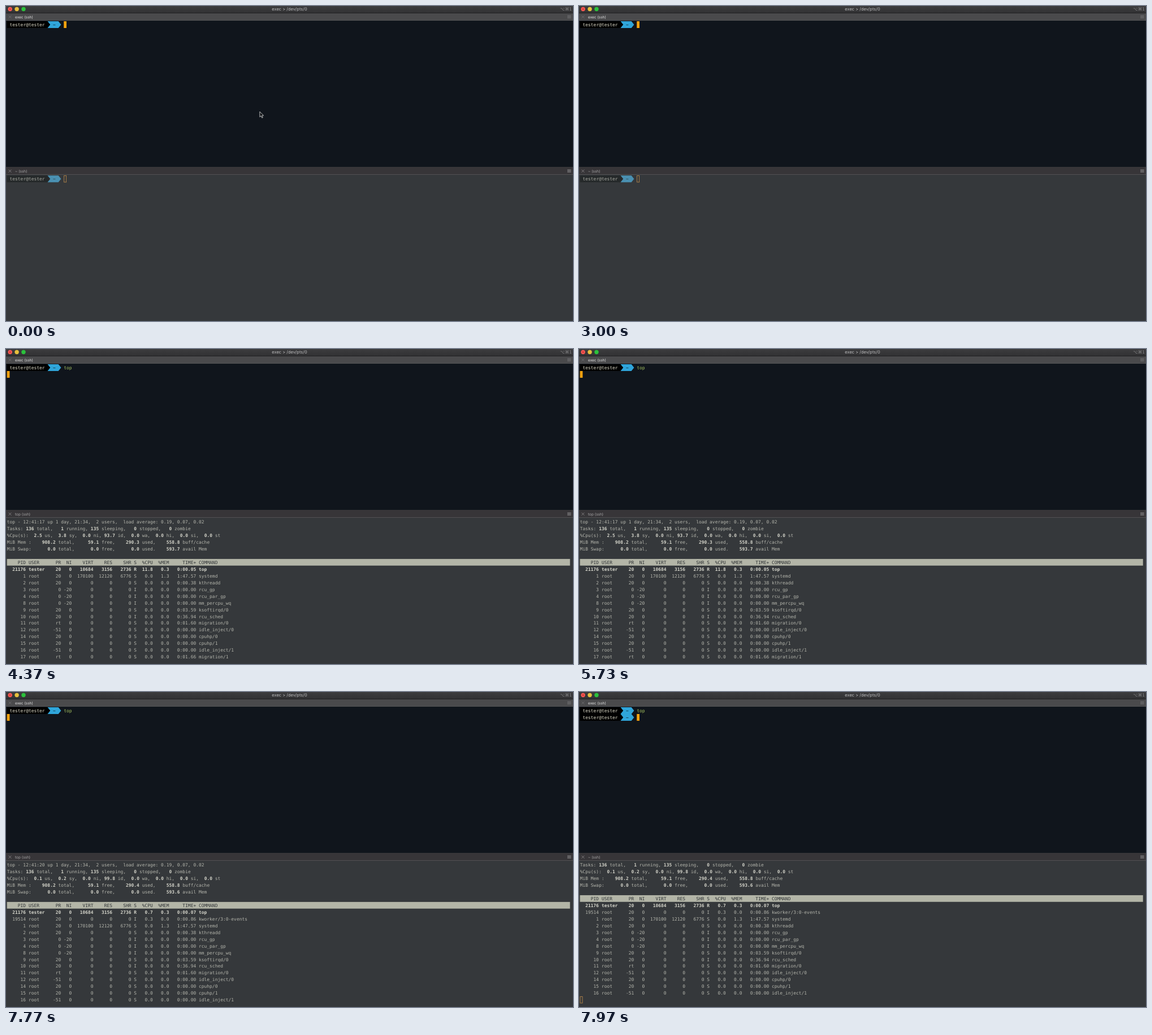
Recreate the animation shown at these times as an HTML page. Size 1003 px wide and 558 px high, loop 8 s.

```html
<!DOCTYPE html>
<html lang="en">
<head>
<meta charset="utf-8">
<title>Terminal panes</title>
<style>
  html, body { margin: 0; width: 100%; height: 100%; overflow: hidden; background: #10151c; }
  svg { display: block; width: 1003px; height: 558px; }
  text { white-space: pre; text-rendering: geometricPrecision; }
  .m { font: 7.95px "DejaVu Sans Mono", monospace; }
  .m .b { font-weight: bold; fill: #d4d4ca; }
  .u { font: 6.5px Inter, sans-serif; }
</style>
</head>
<body>
<svg id="stage" viewBox="0 0 1003 558"></svg>
<script>
const LOOP = 8000, CELL = 4.787, ROW = 11.95, LEFT = 1.7, TOP = 27, BOTTOM = 300.2;
const USER = 'tester', HOST = 'tester';
const GREY = '#b4b5ac';
const stage = document.getElementById('stage');

const colX = c => LEFT + c * CELL;
const rect = (x, y, w, h, fill, extra = '') =>
  `<rect x="${x}" y="${y}" width="${w}" height="${h}" fill="${fill}" ${extra}/>`;
const path = (d, fill, extra = '') => `<path d="${d}" fill="${fill}" ${extra}/>`;
const label = (x, y, s, fill, extra = '') =>
  `<text class="u" x="${x}" y="${y}" fill="${fill}" ${extra}>${s}</text>`;
const mono = (col, y, s, fill) =>
  `<text class="m" x="${colX(col)}" y="${y + 9}" fill="${fill}">${s}</text>`;
const bold = s => `<tspan class="b">${s}</tspan>`;

function prompt(y, dim) {
  const x = colX(15), tip = colX(16), end = colX(19), mid = y + 6, low = y + 12;
  return path(`M${LEFT} ${y}H${x}L${tip} ${mid} ${x} ${low}H${LEFT}z`, dim ? '#25292a' : '#000') +
    path(`M${x} ${y}H${end}L${colX(20)} ${mid} ${end} ${low}H${x}L${tip} ${mid}z`, dim ? '#4a90b1' : '#2fa5da') +
    mono(1, y, `${USER}@${HOST}`, dim ? '#a9aaa2' : '#dcdac8') +
    mono(17, y, '~', dim ? '#2b3336' : '#0c1116');
}

const block = (col, y) => rect(colX(col), y, CELL, 12, '#f6a20f');
const hollow = (col, y) =>
  rect(colX(col) + .4, y + .4, CELL - .8, 11.4, 'none', 'stroke="#b3854a" stroke-width=".9"');

function tabBar(y, title, active) {
  const fg = active ? '#737375' : '#8c8a8c';
  const lines = [17.2, 19.2, 21.2].map(v => `M993 ${y + v - 13}h6.6`).join('');
  return rect(0, y, 1003, 12, active ? '#4a4a4c' : '#373538') +
    rect(0, y + 12, 1003, 1, active ? '#525254' : '#525153') +
    path(`M4.5 ${y + 3.8}l5 5m0-5l-5 5`, 'none', `stroke="${fg}" stroke-width=".8"`) +
    path(lines, 'none', `stroke="${fg}" stroke-width="1"`) +
    label(16, y + 8.7, title, active ? '#e4e4e4' : '#a9a8a9');
}

const lights = ['#fc5753', '#e6bf3d', '#2bc23c']
  .map((c, i) => `<circle cx="${7.2 + 11.9 * i}" cy="5.5" r="3.7" fill="${c}"/>`).join('');
const frame =
  `<defs><linearGradient id="bar" x2="0" y2="1"><stop stop-color="#3c3c3e"/><stop offset="1" stop-color="#323234"/></linearGradient></defs>` +
  rect(0, 0, 1003, 558, '#10151c') + rect(0, 0, 1003, 12, 'url(#bar)') + rect(0, 12, 1003, 1, '#202022') +
  lights + path('M6 4.3l2.4 2.4m0-2.4l-2.4 2.4', 'none', 'stroke="#8d1d1b" stroke-width=".8"') +
  label(501.5, 8.2, 'exec &gt; /dev/pts/0', '#bcbcbd', 'text-anchor="middle" style="font-size:7.5px"') +
  label(1001, 8.2, '⌥⌘1', '#8b8b8d', 'text-anchor="end" style="font:7.5px \'DejaVu Sans\',sans-serif"') +
  tabBar(13, 'exec (ssh)', true) +
  rect(0, 285, 1003, 1, '#38373a') + rect(0, 286, 1003, 272, '#35383b');

const pointer = path('M448.9 187.2v9.4l2.2-2 1.7 3.6 1.5-.7-1.6-3.4h2.9z', '#0b0d10', 'stroke="#e6e6e6" stroke-width=".8"');

// Process list: pid, priority, nice, state, time, command
const idle = `2 20 0 S 0:00.38 kthreadd
3 0 -20 I 0:00.00 rcu_gp
4 0 -20 I 0:00.00 rcu_par_gp
8 0 -20 I 0:00.00 mm_percpu_wq
9 20 0 S 0:03.59 ksoftirqd/0
10 20 0 I 0:36.94 rcu_sched
11 rt 0 S 0:01.60 migration/0
12 -51 0 S 0:00.00 idle_inject/0
14 20 0 S 0:00.00 cpuhp/0
15 20 0 S 0:00.00 cpuhp/1
16 -51 0 S 0:00.00 idle_inject/1
17 rt 0 S 0:01.66 migration/1`.split('\n').map(line => {
  const [pid, pr, ni, state, time, cmd] = line.split(' ');
  return [pid, 'root', pr, ni, 0, 0, 0, state, '0.0', '0.0', time, cmd];
});
const systemd = '1 root 20 0 170100 12120 6776 S 0.0 1.3 1:47.57 systemd'.split(' ');
const kworker = '19514 root 20 0 0 0 0 I 0.3 0.0 0:00.86 kworker/3:0-events'.split(' ');
const heads = 'PID USER PR NI VIRT RES SHR S %CPU %MEM TIME+ COMMAND'.split(' ');
const widths = [7, -8, 3, 3, 7, 6, 6, 1, 5, 5, 9, -1];
const columns = row => row.map((v, i) =>
  widths[i] < 0 ? String(v).padEnd(-widths[i]) : String(v).padStart(widths[i])).join(' ');

function topLines(second) {
  const pick = (a, b) => second ? b : a;
  const summary = [
    'Tasks: 136 total,   1 running, 135 sleeping,   0 stopped,   0 zombie',
    `%Cpu(s):  ${pick('2.5 us,  3.8', '0.1 us,  0.2')} sy,  0.0 ni, ${pick(93.7, 99.8)} id,  0.0 wa,  0.0 hi,  0.0 si,  0.0 st`,
    `MiB Mem :    908.2 total,     59.1 free,    ${pick(290.3, 290.4)} used,    558.8 buff/cache`,
    `MiB Swap:      0.0 total,      0.0 free,      0.0 used.    ${pick(593.7, 593.6)} avail Mem`
  ].map(s => s.replace(/\d[\d.]*(?= [a-z])/g, bold));
  const self = [21176, USER, 20, 0, 10684, 3156, 2736, 'R', pick('11.8', '0.7'), '0.3', pick('0:00.05', '0:00.07'), 'top'];
  const rows = [...(second ? [kworker] : []), systemd, ...idle].slice(0, 13);
  return [`top - 12:41:${pick(17, 20)} up 1 day, 21:34,  2 users,  load average: 0.19, 0.07, 0.02`,
    ...summary, '', columns(heads), bold(columns(self)), ...rows.map(columns)];
}

function topScreen(second, scroll) {
  return topLines(second).slice(scroll).map((s, i) => {
    const y = BOTTOM + i * ROW, head = i + scroll === 6;
    return (head ? rect(LEFT, y, 996, 11.8, '#b3b5a7') : '') + mono(0, y, s, head ? '#2f3335' : GREY);
  }).join('');
}

const HIDE = 3000, KEYS = [3200, 3330, 3430], ENTER = 4100, START = 4170,
  SHOW = 4370, UPDATE = 7370, QUIT = 7900;

function scene(t) {
  const typed = 'top'.slice(0, KEYS.filter(k => t >= k).length);
  const running = t >= START && t < QUIT, quit = t >= QUIT, next = TOP + ROW;
  let out = frame + tabBar(286, running ? 'top (ssh)' : '~ (ssh)', false) + prompt(TOP, false) +
    mono(21, TOP, typed, typed === 'top' ? '#a5c261' : '#d9605a');

  if (quit) out += prompt(next, false) + block(21, next);
  else out += t < ENTER ? block(21 + typed.length, TOP) : block(0, next);

  if (t < SHOW) out += prompt(BOTTOM, true) + (running ? '' : hollow(21, BOTTOM));
  else out += topScreen(t >= UPDATE, quit ? 1 : 0) + (quit ? hollow(0, BOTTOM + 20 * ROW) : '');

  return out + (t < HIDE ? pointer : '');
}

let shown = '';
function tick() {
  const markup = scene(performance.now() % LOOP);
  if (markup !== shown) stage.innerHTML = shown = markup;
  requestAnimationFrame(tick);
}
tick();
</script>
</body>
</html>
```
